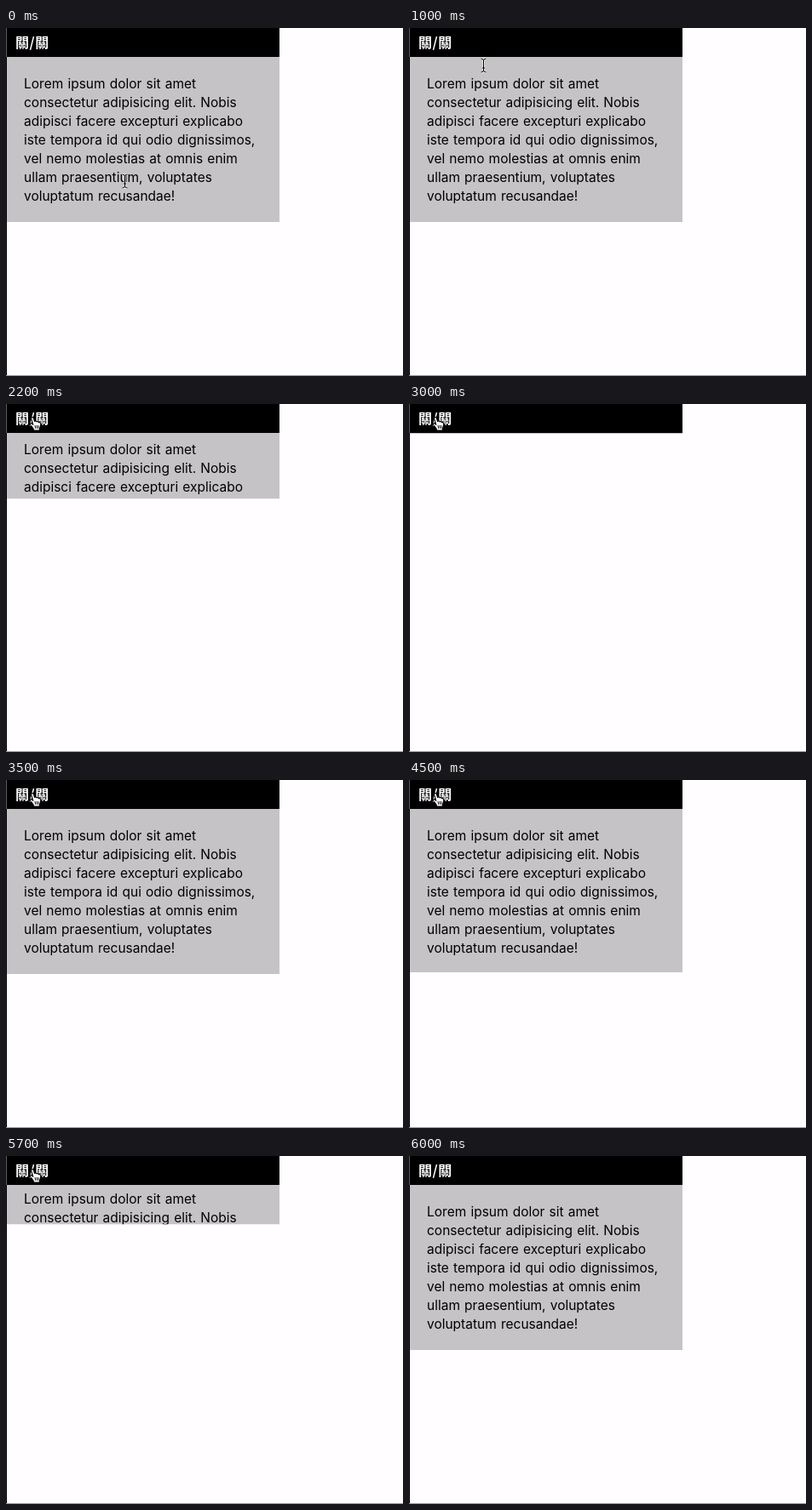
Recreate the animation shown at these times as an HTML page. Size 466x409 px, loop 7 s.

```html
<!DOCTYPE html>
<html lang="zh-Hant">
<head>
<meta charset="utf-8">
<title>Slide toggle</title>
<style>
  html, body { margin: 0; width: 100%; height: 100%; overflow: hidden; background: #fffdff; }
  svg { display: block; }
  .head { font: 700 16px "Noto Sans CJK TC", "Noto Sans CJK", "Noto Sans", sans-serif; letter-spacing: .5px; fill: #fff; }
  .body { font: 15.5px Inter, "Noto Sans", sans-serif; word-spacing: .8px; fill: #000; }
</style>
</head>
<body>
<svg id="stage" width="466" height="409" viewBox="0 0 466 409">
  <rect width="466" height="409" fill="#fffdff"/>
  <svg id="panel" x="1" y="34" width="320" height="194">
    <rect width="320" height="194" fill="#c5c3c6"/>
    <g id="copy" class="body"></g>
  </svg>
  <rect x="1" width="320" height="34" fill="#000"/>
  <text class="head" x="11" y="23">關/關</text>
  <rect width="1" height="409" fill="#000"/>
  <rect width="1" height="34" fill="#5c5c5c"/>
  <rect y="408" width="466" height="1" fill="#9a999a"/>
  <g id="beam" fill="none">
    <path d="M-3 -8Q0 -8 0 -5.5Q0 -8 3 -8M0 -6V6M-3 8Q0 8 0 5.5Q0 8 3 8M-1.5 3H1.5" stroke="#fff" stroke-width="2.6" opacity=".75"/>
    <path d="M-3 -8Q0 -8 0 -5.5Q0 -8 3 -8M0 -6V6M-3 8Q0 8 0 5.5Q0 8 3 8M-1.5 3H1.5" stroke="#000"/>
  </g>
  <g id="hand" stroke="#000" stroke-width="1.1" stroke-linejoin="round" stroke-linecap="round">
    <path fill="#fff" d="M-2.2 8V6.4C-3 4.6 -4.8 3.2 -6 1.2C-6.5 -.2 -4.9 -.9 -3.9 .2L-2.7 1.5L-4.8 -5.6C-5.2 -7.8 -2.9 -8.4 -2.2 -6.4L-.9 -2.4C-.4 -3.6 1.2 -3.3 1.5 -2C2.2 -3 3.6 -2.6 3.8 -1.2C4.8 -1.9 6 -1.2 6.2 .2C6.5 3 5.4 4.6 4.8 6.2V8Z"/>
    <path fill="none" stroke-width=".9" d="M-.4 2.4L0 5.4M1.6 2.4L1.8 5.4M3.5 2.4V5.4"/>
  </g>
</svg>
<script>
const LOOP = 7000, STEP = 100, FULL = 194, PAD = 20;
const $ = id => document.getElementById(id);

const lines = [
  "Lorem ipsum dolor sit amet",
  "consectetur adipisicing elit. Nobis",
  "adipisci facere excepturi explicabo",
  "iste tempora id qui odio dignissimos,",
  "vel nemo molestias at omnis enim",
  "ullam praesentium, voluptates",
  "voluptatum recusandae!"
];
lines.forEach((str, i) => {
  const el = document.createElementNS("http://www.w3.org/2000/svg", "text");
  el.setAttribute("x", 20);
  el.setAttribute("y", 37 + 22 * i);
  el.textContent = str;
  $("copy").append(el);
});

// Toggles: start, duration, final openness
const slides = [
  [1974, 400, 0],
  [2980, 450, 1],
  [4474, 400, 0],
  [5570, 400, 1]
];

// Pointer stops: time, shape, x, y
const stops = [
  [0, "beam", 139.5, 180],
  [100, "beam", 143.5, 152],
  [400, "beam", 107, 82],
  [500, "hand", 73.5, 11.5],
  [900, "beam", 84, 57],
  [1000, "beam", 87.5, 44],
  [1100, "hand", 69, 24],
  [1200, "hand", 57.5, 8.5],
  [1400, "hand", 49, 13],
  [1500, "hand", 41, 19],
  [1600, "hand", 36, 22],
  [1700, "hand", 34.5, 23],
  [6000, "none", 0, 0]
];

const swing = k => .5 - Math.cos(Math.PI * Math.min(1, k)) / 2;

function openness(t) {
  const now = slides.filter(s => s[0] <= t).pop();
  if (!now) return 1;
  const k = swing((t - now[0]) / now[1]);
  return now[2] ? k : 1 - k;
}

function draw(time) {
  const t = Math.floor((time % LOOP) / STEP) * STEP;
  const open = openness(t);
  $("panel").setAttribute("height", FULL * open);
  $("panel").style.display = open > 0 ? "" : "none";
  $("copy").setAttribute("transform", `translate(0 ${PAD * (open - 1)})`);

  const [, shape, x, y] = stops.filter(s => s[0] <= t).pop();
  for (const id of ["beam", "hand"]) {
    $(id).style.display = id === shape ? "" : "none";
    $(id).setAttribute("transform", `translate(${x} ${y})`);
  }
}

const start = performance.now();
function tick() {
  draw(performance.now() - start);
  requestAnimationFrame(tick);
}
tick();
</script>
</body>
</html>
```
